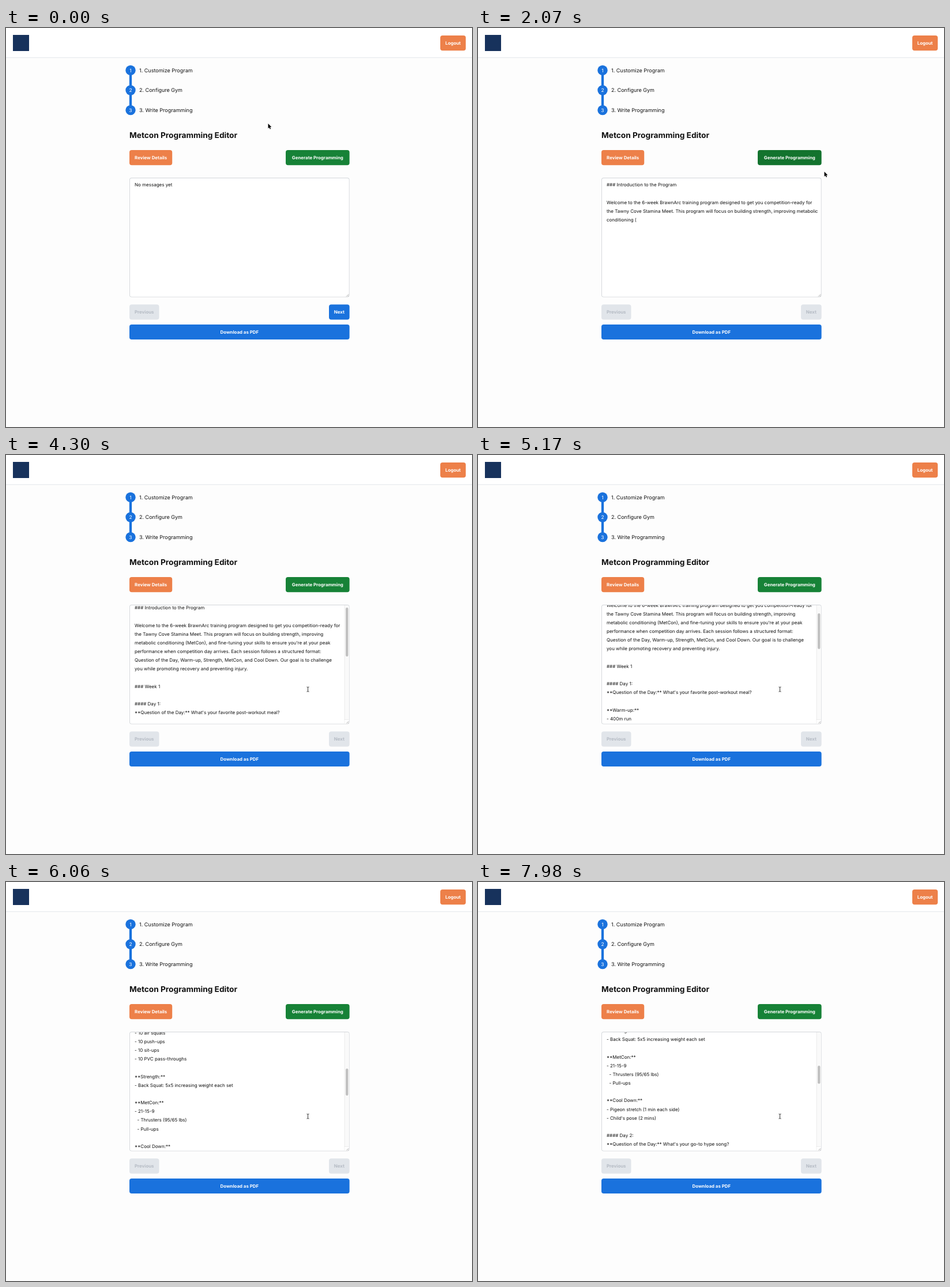
Animation, 808 px wide and 693 px high, one loop 8000 ms. Source, as an HTML page with a canvas:

```html
<!DOCTYPE html>
<html lang="en">
<head>
<meta charset="utf-8">
<title>Programming editor</title>
<style>
  html, body { margin: 0; width: 100%; height: 100%; overflow: hidden; background: #fdfdfd; }
  canvas { display: block; width: 808px; height: 693px; }
</style>
</head>
<body>
<canvas id="stage"></canvas>
<script>
const W = 808, H = 693, LOOP = 8000, STEP = 147.7;
const LINE = 15.17, FIRST_BASELINE = 275.2;
const BLUE = '#1a72dd', ORANGE = '#ed8049', GREY = '#e1e5ea', INK = '#111';
const FONT = 'Inter, "Open Sans", sans-serif';

const canvas = document.getElementById('stage');
const ctx = canvas.getContext('2d');
const dpr = window.devicePixelRatio || 1;
canvas.width = W * dpr;
canvas.height = H * dpr;

const OPENING = `### Introduction to the Program

Welcome to the 6-week BrawnArc training program designed to get you competition-ready for
`;
const WEEK = `
### Week 1

#### Day 1:
**Question of the Day:** What's your favorite post-workout meal`;

// Line breaks before and after the scrollbar narrows the box
const wideText = OPENING +
`the Tawny Cove Stamina Meet. This program will focus on building strength, improving metabolic
conditioning (MetCon), and fine-tuning your skills to ensure you're at your peak performance
when competition day arrives. Each session follows a structured format: Question of the Day,
Warm-up, Strength, MetCon, and Cool Down. Our goal is to challenge you while promoting
recovery and preventing injury.
` + WEEK;

const narrowLines = (OPENING +
`the Tawny Cove Stamina Meet. This program will focus on building strength, improving
metabolic conditioning (MetCon), and fine-tuning your skills to ensure you're at your peak
performance when competition day arrives. Each session follows a structured format:
Question of the Day, Warm-up, Strength, MetCon, and Cool Down. Our goal is to challenge
you while promoting recovery and preventing injury.
` + WEEK + `?

**Warm-up:**
- 400m run
- 10 air squats
- 10 push-ups
- 10 sit-ups
- 10 PVC pass-throughs

**Strength:**
- Back Squat: 5x5 increasing weight each set

**MetCon:**
- 21-15-9
  - Thrusters (95/65 lbs)
  - Pull-ups

**Cool Down:**
- Pigeon stretch (1 min each side)
- Child's pose (2 mins)

#### Day 2:
**Question of the Day:** What's your go-to hype song?
`).split('\n');

// Tracks are keyed by step: [step, value, ...]
const pausePoint = wideText.indexOf('conditioning (') + 14;
const typed = [[11, 50], [14, pausePoint], [21, wideText.length]];
const hover = [[3, 0], [7, 1], [15, 1], [18, 0]];
const scroll = [[26, 0], [29, 7], [32, 18], [35, 42], [38, 140], [41, 253.2], [47, 290], [54, 332.7]];
const thumb = [[22, 263, 176], [26, 263, 112], [29, 265, 85], [35, 275, 62], [38, 300, 54], [41, 324, 47], [54, 319, 31.5]];
const pointer = [
  [0, 454.5, 166], [1, 505, 188], [2, 554, 212.5], [3, 554, 212.5], [7, 556, 223.5],
  [11, 557, 224], [12, 567, 229], [13, 582, 239], [14, 600.5, 249.5], [15, 630, 287],
  [16, 655, 335], [17, 673, 380], [18, 685, 422], [19, 691, 442], [21, 695.5, 453],
  [25, 693, 458], [26, 655, 444], [27, 580, 421], [28, 532, 409], [29, 523.5, 407]
];

function at(track, k) {
  if (k <= track[0][0]) return track[0].slice(1);
  for (let i = 1; i < track.length; i++) {
    const a = track[i - 1], b = track[i];
    if (k <= b[0]) {
      const p = (k - a[0]) / (b[0] - a[0]);
      return a.slice(1).map((v, j) => v + (b[j + 1] - v) * p);
    }
  }
  return track[track.length - 1].slice(1);
}

function text(str, x, y, size, color = INK, weight = 400, align = 'left') {
  ctx.font = `${weight} ${size}px ${FONT}`;
  ctx.fillStyle = color;
  ctx.textAlign = align;
  ctx.fillText(str, x, y);
}

function box(x, y, w, h, r, fill) {
  ctx.beginPath();
  ctx.roundRect(x, y, w, h, r);
  ctx.fillStyle = fill;
  ctx.fill();
}

function line(color, width, ...p) {
  ctx.beginPath();
  ctx.moveTo(p[0], p[1]);
  for (let i = 2; i < p.length; i += 2) ctx.lineTo(p[i], p[i + 1]);
  ctx.strokeStyle = color;
  ctx.lineWidth = width;
  ctx.stroke();
}

function button(label, x, y, w, fill, color = '#fff') {
  box(x, y, w, 26.2, 4, fill);
  text(label, x + w / 2, y + 16, 7.85, color, 700, 'center');
}

function header() {
  box(0, 0, W, 51, 0, '#fff');
  box(0, 51, W, 1, 0, '#e5e7eb');
  box(12, 12, 28, 28, 0, '#17325c');
  button('Logout', 753, 13, 44.2, ORANGE);
}

function steps() {
  line(BLUE, 4.3, 216, 73.5, 216, 142.5);
  ['Customize Program', 'Configure Gym', 'Write Programming'].forEach((name, i) => {
    const y = 73.4 + i * 34.6;
    ctx.beginPath();
    ctx.arc(216, y, 8.7, 0, Math.PI * 2);
    ctx.fillStyle = BLUE;
    ctx.fill();
    text(i + 1, 216, y + 3.1, 8.5, '#fff', 400, 'center');
    text(`${i + 1}. ${name}`, 231, y + 3.1, 9);
  });
}

function editor(k) {
  const narrow = k >= 22;
  box(214, 260, 381.6, 207.6, 4, '#d3d6da');
  box(214.9, 260.9, 379.8, 205.8, 3.2, '#fff');
  ctx.save();
  ctx.beginPath();
  ctx.roundRect(214.9, 260.9, 379.8, 205.8, 3.2);
  ctx.clip();

  let lines = ['No messages yet'];
  if (narrow) lines = narrowLines;
  else if (k >= 11) lines = wideText.slice(0, Math.round(at(typed, k)[0])).split('\n');
  const top = FIRST_BASELINE - at(scroll, k)[0];
  lines.forEach((str, i) => text(str, 223, top + i * LINE, 8));

  if (narrow) {
    box(586.7, 260, 9, 208, 0, '#fafafa');
    box(586.7, 260, 0.8, 208, 0, '#e8e8e8');
    box(586.7, 459, 9, 0.8, 0, '#e0e0e0');
    box(587.5, 459.8, 8, 8, 0, '#fff');
    const [y, h] = at(thumb, k);
    box(589, y, 4.4, h, 2.2, '#c1c1c1');
  }
  line('#777', 0.6, 590, 466.6, 594.4, 462.2);
  line('#777', 0.6, 592.4, 466.6, 594.4, 464.6);
  ctx.restore();
}

function arrow() {
  ctx.beginPath();
  ctx.moveTo(0, 0);
  [[0, 8.4], [1.9, 6.7], [3.2, 9.7], [4.6, 9.1], [3.3, 6.2], [5.8, 6]].forEach(p => ctx.lineTo(...p));
  ctx.closePath();
  paintCursor();
}

function hand() {
  ctx.beginPath();
  ctx.moveTo(-0.9, 0.8);
  ctx.quadraticCurveTo(0, -0.6, 0.9, 0.8);
  [[0.9, 3.5], [4.6, 4.3], [4.8, 6.5], [3.8, 10], [-0.9, 10], [-3.2, 6.4], [-2.4, 5.6], [-0.9, 6.8]]
    .forEach(p => ctx.lineTo(...p));
  ctx.closePath();
  paintCursor();
}

function paintCursor() {
  ctx.lineJoin = 'round';
  ctx.strokeStyle = '#fff';
  ctx.lineWidth = 1.3;
  ctx.stroke();
  ctx.fillStyle = '#000';
  ctx.fill();
}

function beam() {
  line('#222', 0.9, 0, -3.8, 0, 3.8);
  for (const y of [-4, 4]) line('#222', 0.9, -2, y, -0.5, y, 0, y * 0.88, 0.5, y, 2, y);
}

function cursor(k) {
  const [x, y] = at(pointer, k);
  const inside = x > 214 && x < 595;
  ctx.save();
  ctx.translate(x, y);
  if (inside && y > 260) beam();
  else if (inside && x > 485 && y > 212 && y < 238) hand();
  else arrow();
  ctx.restore();
}

function draw(t) {
  const k = Math.floor((t + 8) / STEP);
  ctx.setTransform(dpr, 0, 0, dpr, 0, 0);
  ctx.textRendering = 'geometricPrecision';
  box(0, 0, W, H, 0, '#fdfdfd');
  header();
  steps();
  text('Metcon Programming Editor', 214, 190.8, 13.7, INK, 700);
  button('Review Details', 214, 212, 74.2, ORANGE);
  const d = at(hover, k)[0];
  button('Generate Programming', 485, 212, 110.6, `rgb(${23 - 4 * d}, ${130 - 15 * d}, ${55 - 9 * d})`);
  editor(k);
  button('Previous', 214, 480.2, 51.5, GREY, '#b5bbc4');
  if (k < 11) button('Next', 560, 480.2, 35.6, BLUE);
  else button('Next', 560, 480.2, 35.6, GREY, '#b5bbc4');
  button('Download as PDF', 214, 514.9, 381.6, BLUE);
  cursor(k);
}

const start = performance.now();
function frame() {
  draw((performance.now() - start) % LOOP);
  requestAnimationFrame(frame);
}
frame();
</script>
</body>
</html>
```
